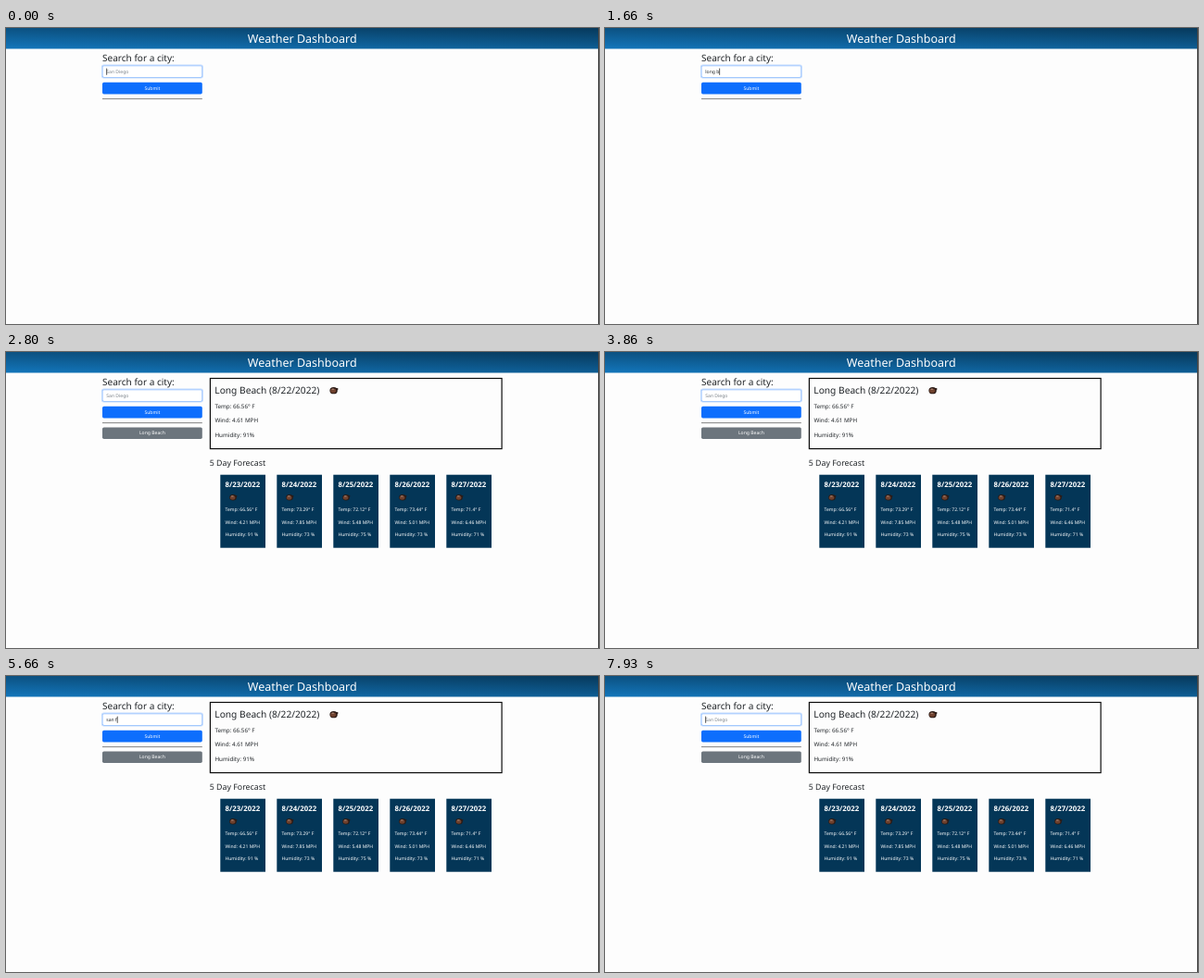
Write an HTML page with a canvas that moves like this. It is 640 by 320 pixels and loops after 8000 ms.

```html
<!DOCTYPE html>
<html lang="en">
<head>
<meta charset="utf-8">
<title>Weather Dashboard</title>
<style>
  html, body { margin: 0; width: 100%; height: 100%; overflow: hidden; background: #fdfdfd; }
  canvas { display: block; }
</style>
</head>
<body>
<canvas id="stage" width="640" height="320"></canvas>
<script>
const ctx = document.getElementById("stage").getContext("2d");
const LOOP = 8000, BLINK = 530;
const INK = "#212529", NAVY = "#043657", WHITE = "#fff";

// Each entry: words, the times of its keystrokes, and the time it is sent.
const entries = [
  { words: "long beach", keys: [1130, 1200, 1330, 1400, 1460, 1660, 1860, 2000, 2130, 2260], sent: 2530 },
  { words: "san francisco", keys: [4330, 4400, 4460, 4600, 5660, 5860, 6060, 6200, 6330, 6530, 6600, 6660, 6860], sent: 7530 }
];
const RESULTS_AT = 2800;
const FIRST_BLINK = -200;

const forecast = [
  ["8/23/2022", "66.56", "4.21", 91],
  ["8/24/2022", "73.29", "7.85", 73],
  ["8/25/2022", "72.12", "5.48", 75],
  ["8/26/2022", "73.44", "5.01", 73],
  ["8/27/2022", "71.4", "6.46", 71]
];

function text(str, x, y, size, color = INK, weight = 400, align = "left") {
  ctx.font = `${weight} ${size}px "Noto Sans", "Open Sans", sans-serif`;
  ctx.textRendering = "geometricPrecision";
  ctx.textAlign = align;
  ctx.fillStyle = color;
  ctx.fillText(str, x, y);
}

function rect(x, y, w, h, color) {
  ctx.fillStyle = color;
  ctx.fillRect(x, y, w, h);
}

function rounded(x, y, w, h, r, color) {
  ctx.beginPath();
  ctx.roundRect(x, y, w, h, r);
  ctx.fillStyle = color;
  ctx.fill();
}

function ellipse(x, y, rx, ry, color) {
  ctx.beginPath();
  ctx.ellipse(x, y, rx, ry, 0, 0, Math.PI * 2);
  ctx.fillStyle = color;
  ctx.fill();
}

function button(label, y, color) {
  rounded(104, y, 107.8, 12.6, 1.7, color);
  text(label, 157.9, y + 8, 5.08, WHITE, 400, "center");
}

function weatherIcon(x, y, scale) {
  ctx.save();
  ctx.translate(x, y);
  ctx.scale(scale, scale);
  ellipse(0, 0.1, 3.8, 3.3, "#2b1b16");
  ellipse(3.3, -1.4, 1.2, 0.9, "#2b1b16");
  ellipse(-0.4, 0.3, 2.8, 2.2, "#6f412e");
  ellipse(-0.7, -1.3, 1.5, 0.7, "#a27f6e");
  ctx.restore();
}

// A gradient running up and slightly right, bright at the lower left.
function headerFill(w, h) {
  const gx = 0.4 / w, gy = -0.6 / h, len = gx * gx + gy * gy;
  const fill = ctx.createLinearGradient(0, h, gx / len, h + gy / len);
  fill.addColorStop(0, "#1376bb");
  fill.addColorStop(1, "#07395b");
  return fill;
}
const headerColor = headerFill(640, 22.5);

function fieldState(t) {
  let typed = "", blinkStart = FIRST_BLINK;
  for (const { words, keys, sent } of entries) {
    const pressed = keys.filter(k => k <= t);
    if (!pressed.length) continue;
    blinkStart = pressed[pressed.length - 1];
    typed = t < sent ? words.slice(0, pressed.length) : "";
  }
  return { typed, caret: Math.floor((t - blinkStart) / BLINK) % 2 === 0 };
}

function drawSearch(t) {
  const { typed, caret } = fieldState(t);
  text("Search for a city:", 104, 35.9, 10.05, INK, 500);
  rounded(102.9, 39.6, 110, 14.9, 2.7, "#c2dbfe");
  rounded(104, 40.7, 107.8, 12.7, 1.7, "#86b7fe");
  rounded(104.5, 41.2, 106.8, 11.7, 1.3, WHITE);
  text(typed || "San Diego", 108.3, 48.9, 5.05, typed ? INK : "#7b838a");
  if (caret) rect(108.4 + (typed ? ctx.measureText(typed).width : 0), 43.6, 0.7, 7.2, "#111");
  button("Submit", 58.8, "#0d6efd");
  rect(104, 76.2, 107.8, 0.9, "#777");
}

function drawResults() {
  button("Long Beach", 81.4, "#6c757d");
  ctx.strokeStyle = "#0a0a0a";
  ctx.lineWidth = 1.2;
  ctx.strokeRect(220.4, 28.5, 314.7, 76.1);
  text("Long Beach (8/22/2022)", 225.3, 45.1, 10.2, INK, 500);
  weatherIcon(353.6, 41.6, 1.1);
  ["Temp: 66.56° F", "Wind: 4.61 MPH", "Humidity: 91%"].forEach((line, i) =>
    text(line, 225.4, 61 + i * 15.35, 6.27, INK, 500));

  text("5 Day Forecast", 219.8, 122.8, 8.8, INK, 500);
  forecast.forEach(([date, temp, wind, humidity], i) => {
    const x = 231.3 + i * 61;
    rect(x, 132.7, 48.7, 79, NAVY);
    text(date, x + 5.2, 145.8, 7.8, WHITE, 600);
    weatherIcon(x + 13.7, 157.2, 1);
    text(`Temp: ${temp}° F`, x + 5.2, 172.4, 5.06, WHITE);
    text(`Wind: ${wind} MPH`, x + 5.2, 185.8, 5.06, WHITE);
    text(`Humidity: ${humidity} %`, x + 5.2, 199.2, 5.06, WHITE);
  });
}

function draw(t) {
  rect(0, 0, 640, 320, "#fdfdfd");
  rect(0, 0, 640, 22.5, headerColor);
  text("Weather Dashboard", 319.7, 16.4, 12.5, WHITE, 500, "center");
  drawSearch(t);
  if (t >= RESULTS_AT) drawResults();
  rect(639, 0, 1, 320, "#444");
}

const start = performance.now();
function frame() {
  draw((performance.now() - start) % LOOP);
  requestAnimationFrame(frame);
}
frame();
</script>
</body>
</html>
```
